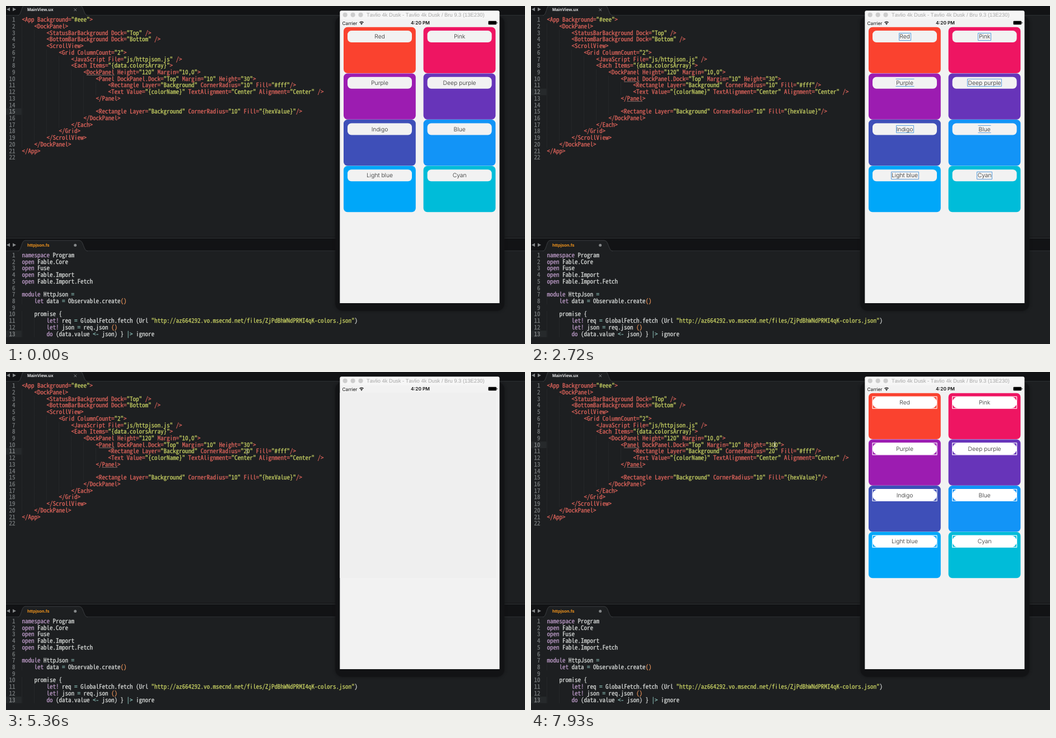
Recreate the animation shown at these times as an HTML page with a canvas. Size 927 by 604 pixels, loop 8 s.

```html
<!DOCTYPE html>
<html lang="en">
<head>
<meta charset="utf-8">
<title>Live code preview</title>
<style>
html, body { margin: 0; width: 100%; height: 100%; overflow: hidden; background: #1d1f21; }
canvas { display: block; width: 927px; height: 604px; }
</style>
</head>
<body>
<canvas id="stage"></canvas>
<script>
const W = 927, H = 604, LOOP = 8000;
const canvas = document.getElementById('stage');
const ctx = canvas.getContext('2d');
const dpr = window.devicePixelRatio || 1;
canvas.width = W * dpr;
canvas.height = H * dpr;
ctx.scale(dpr, dpr);
ctx.textRendering = 'geometricPrecision';
ctx.fontKerning = 'none';
ctx.lineJoin = 'round';

const CELL = 5.5, ROW = 11.71, LEFT = 28.5;
const MONO = '"Noto Sans Mono CJK JP", "Noto Sans Mono CJK SC", "Noto Sans Mono", monospace';
const UI = 'Inter, "Open Sans", sans-serif';
const HELV = '"Liberation Sans", Arial, sans-serif';
const RED = '#e0655c', GREEN = '#c8d163', PURPLE = '#bd9bc8', WHITE = '#d8dbd9',
      TEAL = '#8abeb7', ORANGE = '#e8935a', BG = '#1d1f21', PAPER = '#f2f2f2';

// Size at which one monospace cell is exactly CELL wide
ctx.font = `100px ${MONO}`;
const codeFont = `${CELL * 100 / ctx.measureText('0').width}px ${MONO}`;

const markup = `<App Background="#eee">
    <DockPanel>
        <StatusBarBackground Dock="Top" />
        <BottomBarBackground Dock="Bottom" />
        <ScrollView>
            <Grid ColumnCount="2">
                <JavaScript File="js/httpjson.js" />
                <Each Items="{data.colorsArray}">
                    <DockPanel Height="120" Margin="10,0">
                        <Panel DockPanel.Dock="Top" Margin="10" Height="@H">
                            <Rectangle Layer="Background" CornerRadius="@R" Fill="#fff"/>
                            <Text Value="{colorName}" TextAlignment="Center" Alignment="Center" />
                        </Panel>

                        <Rectangle Layer="Background" CornerRadius="10" Fill="{hexValue}"/>
                    </DockPanel>
                </Each>
            </Grid>
        </ScrollView>
    </DockPanel>
</App>
`;

const program = `namespace Program
open Fable.Core
open Fuse
open Fable.Import
open Fable.Import.Fetch

module HttpJson =
    let data = Observable.create()

    promise {
        let! req = GlobalFetch.fetch (Url "http://az664292.vo.msecnd.net/files/ZjPdBhWNdPRMI4qK-colors.json")
        let! json = req.json ()
        do (data.value <- json) } |> ignore`.split('\n');

const swatches = [
  ['Red', '#fa422f'], ['Pink', '#ee1562'],
  ['Purple', '#9c1cb1'], ['Deep purple', '#6734b9'],
  ['Indigo', '#3e4fb8'], ['Blue', '#1294f7'],
  ['Light blue', '#00a7f9'], ['Cyan', '#00bcd9']
];

// time, line, column, opacity
const caretKeys = [
  [0, 15, 0, 0], [530, 14, 24, 1], [960, 13, 32, 1], [1310, 13, 32, .5], [1400, 13, 32, 0],
  [1760, 13, 32, .5], [1850, 12, 69, 1], [2200, 12, 70, 1], [2540, 12, 70, .5], [2630, 12, 70, 0],
  [2810, 11, 70, 1], [3080, 11, 71, 1], [3250, 11, 72, 1], [3430, 11, 73, 1], [3870, 11, 73, .5],
  [3960, 11, 73, 0], [4130, 11, 72, 1], [4390, 11, 73, 1], [4750, 11, 73, .5], [4840, 11, 73, 1],
  [5010, 11, 73, .5], [5100, 11, 73, 0], [5360, 11, 73, .7], [5450, 11, 73, 1], [5800, 11, 73, .5],
  [5890, 11, 73, 0], [6150, 10, 73, 1], [6510, 10, 73, .5], [6600, 10, 73, 0], [6690, 10, 73, 1],
  [7140, 10, 73, .5], [7230, 10, 73, 0], [7580, 10, 74, 1]
];

const within = (t, a, b) => t >= a && t < b;

function rect(x, y, w, h, color) {
  ctx.fillStyle = color;
  ctx.fillRect(x, y, w, h);
}

function round(x, y, w, h, r, color) {
  ctx.fillStyle = color;
  ctx.beginPath();
  ctx.roundRect(x, y, w, h, r);
  ctx.fill();
}

function disc(x, y, r, color) {
  ctx.fillStyle = color;
  ctx.beginPath();
  ctx.arc(x, y, r, 0, Math.PI * 2);
  ctx.fill();
}

function line(points, color, width = 1) {
  ctx.strokeStyle = color;
  ctx.lineWidth = width;
  ctx.beginPath();
  points.forEach(([x, y]) => ctx.lineTo(x, y));
  ctx.stroke();
}

function label(text, x, y, font, color, align = 'left') {
  ctx.font = font;
  ctx.fillStyle = color;
  ctx.textAlign = align;
  ctx.fillText(text, x, y);
}

// Code is set slightly heavier than the regular weight
function glyphs(text, x, y, color, align) {
  label(text, x, y, codeFont, color, align);
  ctx.strokeStyle = color;
  ctx.lineWidth = .25;
  ctx.strokeText(text, x, y);
}

const markupColor = s => s[0] === '"' ? GREEN : RED;

function programColor(s) {
  if (s[0] === '"') return GREEN;
  if (/^(namespace|open|module|let!?|do)$/.test(s)) return PURPLE;
  if (s === '()') return ORANGE;
  return /^(=|<-|\|>)$/.test(s) ? TEAL : WHITE;
}

function code(lines, top, current, pattern, color) {
  rect(0, top + (current - 1) * ROW, LEFT - 1, ROW, '#26292b');
  lines.forEach((text, i) => {
    const y = top + i * ROW, base = Math.round(y + 9.4);
    const indent = text ? text.search(/\S/) : (i === 13 ? 24 : 0);
    for (let c = 0; c < indent; c += 4)
      rect(Math.floor(LEFT + c * CELL), y, 1, ROW, 'rgba(255,255,255,.04)');
    glyphs(i + 1, 16.5, base, i + 1 === current ? '#868a8b' : '#787c7e', 'right');
    for (const m of text.matchAll(pattern))
      glyphs(m[0], LEFT + m.index * CELL, base, color(m[0]));
  });
}

function underline(row, col, n, top) {
  rect(LEFT + col * CELL, Math.round(top + row * ROW) - 1, n * CELL, 1, 'rgba(190,150,145,.6)');
}

function tabBar(y, h, tabTop, mid, name, dirty) {
  rect(0, y, W, h, '#121315');
  rect(0, y + h - 1, W, 1, '#2c2f32');
  const b = y + h;
  ctx.beginPath();
  ctx.moveTo(21, b);
  ctx.bezierCurveTo(28, b, 27, tabTop, 34, tabTop);
  ctx.lineTo(131, tabTop);
  ctx.bezierCurveTo(139, tabTop, 138, b, 146, b);
  ctx.fillStyle = BG;
  ctx.fill();
  ctx.strokeStyle = '#3a3d40';
  ctx.lineWidth = 1;
  ctx.stroke();
  for (const [x, d] of [[4, -1], [15, 1]]) {
    ctx.fillStyle = '#85888a';
    ctx.beginPath();
    ctx.moveTo(x + 3 * d, mid);
    ctx.lineTo(x - 3 * d, mid - 3.2);
    ctx.lineTo(x - 3 * d, mid + 3.2);
    ctx.fill();
  }
  label(name, 38, mid + 3, `bold 7.75px ${HELV}`, dirty ? '#f8981d' : '#e6e7e8');
  if (dirty) disc(123.7, mid + .5, 2.5, '#85888a');
  else {
    line([[121.5, mid - 1.5], [126, mid + 3]], '#85888a');
    line([[126, mid - 1.5], [121.5, mid + 3]], '#85888a');
  }
}

function editors(t) {
  const caret = caretKeys.filter(k => k[0] <= t).pop();
  const height = t >= 7580 ? '300' : '30';
  const radius = t < 4130 ? '10' : t < 4390 ? '0' : '20';
  const lines = markup.replace('@H', height).replace('@R', radius).split('\n');
  const top = 18.9;

  rect(0, 0, W, H, BG);
  code(lines, top, caret[1], /"[^"]*"|[^\s"]+/g, markupColor);
  if (t < 610) underline(9, 21, 9, top);
  if (t >= 960) {
    underline(10, 25, 5, top);
    underline(13, 26, 5, top);
  }
  ctx.globalAlpha = caret[3];
  rect(Math.round(LEFT + caret[2] * CELL - .1), Math.round(top + (caret[1] - 1) * ROW), 1, 12, '#dcdedd');
  ctx.globalAlpha = 1;

  tabBar(-2, 19, -2, 6, 'MainView.ux', within(t, 4130, 4840) || within(t, 7580, 7930));
  rect(0, 413, W, 1, '#0c0d0e');
  rect(0, 414, W, 1, '#3a3d40');
  tabBar(415, 23, 419, 427, 'httpjson.fs', true);
  code(program, 439.6, 13, /"[^"]*"|\(\)|<-|\|>|[\w.]+!?|[^\s"]/g, programColor);
}

function statusBar() {
  label('Carrier', 600.5, 33.6, `8.3px ${UI}`, '#111');
  for (const r of [2.4, 4.7]) {
    ctx.strokeStyle = '#111';
    ctx.lineWidth = 1.3;
    ctx.beginPath();
    ctx.arc(635, 32.8, r, -Math.PI * .77, -Math.PI * .23);
    ctx.stroke();
  }
  disc(635, 32.4, 1, '#111');
  label('4:20 PM', 740, 33.4, `600 8.3px ${UI}`, '#111', 'center');
  round(861.5, 26.8, 14.5, 6.5, 1.2, '#000');
  rect(876.6, 28.8, 1, 2.4, '#000');
}

function card(i, t) {
  const [name, color] = swatches[i];
  const x = i % 2 ? 745.6 : 603, y = 37.7 + Math.floor(i / 2) * 82.7;
  const px = x + 7, py = y + 6.4, cx = px + 57.5;
  const font = `300 10.3px ${UI}`;
  round(x, y, 128.8, 82.4, 7, color);
  round(px, py, 115, 21, t < 5360 ? 7 : 10.4, t < 2810 ? PAPER : '#fff');
  label(name, cx, py + 14, font, '#2b2b2b', 'center');

  if (within(t, 2110, 2900)) {
    const w = Math.round(ctx.measureText(name).width / 2 + 1.5);
    const l = Math.round(cx) - w + .5, r = Math.round(cx) + w - .5;
    const a = Math.round(py + 3.5) + .5, b = a + 13;
    const blue = '#5c9fdd';
    line([[l, a], [r, a]], blue);
    line([[l, b], [r, b]], blue);
    if (name !== 'Purple' && name !== 'Blue') {
      line([[l, a], [l, b]], blue);
      line([[r, a], [r, b]], blue);
    }
  }
  if (within(t, 2900, 5010) || t >= 6150) {
    ctx.strokeStyle = '#fff';
    ctx.lineWidth = 1.2;
    ctx.strokeRect(px, py, 115, 21);
  }
}

function phone(t) {
  ctx.save();
  ctx.shadowColor = '#121315';
  ctx.shadowBlur = 5 * dpr;
  round(588.5, 18, 301.5, 526.5, 13, '#121315');
  ctx.restore();
  rect(596.3, 23, 285.2, 508, PAPER);
  round(596.3, 8.3, 285.2, 15, [3, 3, 0, 0], '#f6f6f6');
  for (const x of [605.7, 619.6, 633.5]) disc(x, 15.8, 4.1, '#cdcdcd');
  label('Tavlio 4k Dusk - Tavlio 4k Dusk / Bru 9.3 (13E230)', 644, 19.3, `9.4px ${HELV}`, '#a6a6a6');
  statusBar();
  if (within(t, 5360, 5450)) rect(596.3, 37, 278.7, 331, '#efefef');
  else swatches.forEach((s, i) => card(i, t));
}

const start = performance.now();

function frame() {
  const t = (performance.now() - start) % LOOP;
  editors(t);
  phone(t);
  requestAnimationFrame(frame);
}
frame();
</script>
</body>
</html>
```
